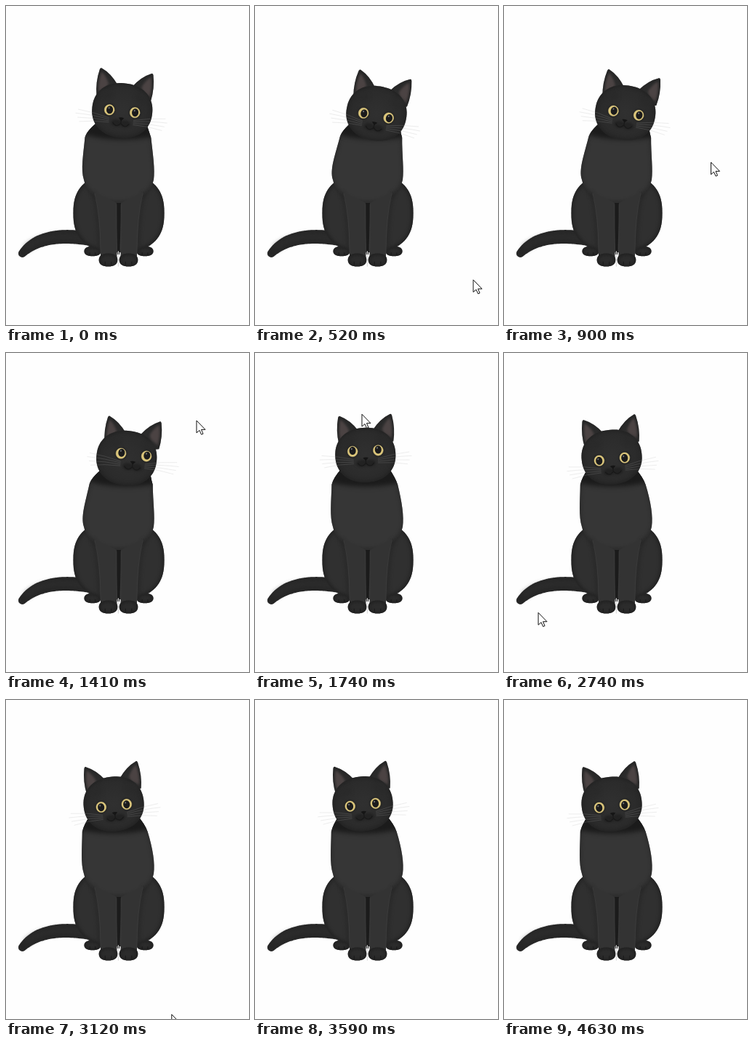
Animation, 334 px wide and 439 px high, one loop 4660 ms. Source, as an HTML page with a canvas:

```html
<!DOCTYPE html>
<html lang="en">
<head>
<meta charset="utf-8">
<title>Black cat watching the pointer</title>
<style>
html, body { margin: 0; width: 100%; height: 100%; overflow: hidden; background: #fefefe; }
canvas { display: block; }
</style>
</head>
<body>
<canvas id="stage" width="334" height="439"></canvas>
<script>
const ctx = document.getElementById('stage').getContext('2d');
const LOOP = 4660;
const MID = 155; // body axis
const SIDES = [-1, 1];

const POSES = [
  { t: 0, turn: 0.55, tilt: 6.3, look: 1.5 },
  { t: 520, turn: 1.03, tilt: 10.9, look: 2.4 },
  { t: 1410, turn: 0.95, tilt: 6.3, look: -5.5 },
  { t: 2100, turn: -1, tilt: -11, look: -4 },
  { t: 2740, turn: -0.23, tilt: -6.5, look: 2 }
];

const POINTER = [
  { t: 150, x: 294, y: 446 },
  { t: 520, x: 300, y: 377 },
  { t: 1080, x: 275, y: 150 },
  { t: 1410, x: 262, y: 93 },
  { t: 1620, x: 200, y: 75 },
  { t: 2100, x: 10, y: 166 },
  { t: 2740, x: 47, y: 357 },
  { t: 3300, x: 280, y: 446 }
];

// Monotone Hermite interpolation of one channel
function sample(keys, name, t) {
  const last = keys.length - 1;
  if (t >= keys[last].t) return keys[last][name];
  const i = Math.max(0, keys.findIndex(k => k.t > t) - 1);
  const slope = n => (keys[n + 1][name] - keys[n][name]) / (keys[n + 1].t - keys[n].t);
  const tangent = n => {
    if (n === 0 || n === last) return 0;
    const p = slope(n - 1), q = slope(n);
    return p * q <= 0 ? 0 : 2 * p * q / (p + q);
  };
  const a = keys[i], b = keys[i + 1], span = b.t - a.t;
  const u = (t - a.t) / span, w = 1 - u;
  return a[name] * (1 + 2 * u) * w * w + b[name] * u * u * (3 - 2 * u)
    + span * (tangent(i) * u * w * w - tangent(i + 1) * u * u * w);
}

function poseAt(t) {
  const turn = sample(POSES, 'turn', t);
  const tilt = sample(POSES, 'tilt', t) * Math.PI / 180;
  const breath = Math.sin(Math.PI * (t - 2740) / 1890) ** 2;
  const look = sample(POSES, 'look', t) - 1.5 * breath;
  return {
    turn, tilt, look,
    x: 151.5 + 15 * turn,
    y: 142.3 + 4.6 * turn * turn + 0.3 * look,
    earX: 13 * turn - 1 - 55 * Math.sin(tilt),
    faceX: -1.5 * turn * Math.min(0, look)
  };
}

function superellipse(x, y, rx, ry, power = 2) {
  const path = new Path2D();
  const bend = v => Math.sign(v) * Math.abs(v) ** (2 / power);
  for (let i = 0; i < 90; i++) {
    const a = i * Math.PI / 45;
    path.lineTo(x + rx * bend(Math.cos(a)), y + ry * bend(Math.sin(a)));
  }
  path.closePath();
  return path;
}

function fill(path, color) {
  ctx.fillStyle = color;
  ctx.fill(path);
}

function line(path, color, width = 1) {
  ctx.strokeStyle = color;
  ctx.lineWidth = width;
  ctx.stroke(path);
}

function soft(blur, draw) {
  ctx.save();
  ctx.filter = `blur(${blur}px)`;
  draw();
  ctx.restore();
}

// Filled shape with a shaded rim and optional inner details
function furry(path, color, rim, width, details) {
  fill(path, color);
  ctx.save();
  ctx.clip(path);
  soft(2, () => line(path, rim, width));
  if (details) details();
  ctx.restore();
}

function glow(r, inner, outer) {
  const g = ctx.createRadialGradient(0, 0, 0, 0, 0, r);
  g.addColorStop(0, inner);
  g.addColorStop(1, outer);
  return g;
}

function drawTail() {
  const tail = new Path2D();
  for (let u = 0; u <= 1; u += 0.01) {
    const w = 1 - u;
    const x = 112 * w * w + 2 * 49 * u * w + 22 * u * u;
    const y = 320 * w * w + 2 * 310 * u * w + 341 * u * u;
    const r = 9.5 - 4 * u ** 3;
    tail.moveTo(x + r, y);
    tail.arc(x, y, r, 0, Math.PI * 2);
  }
  fill(tail, '#262626');
  soft(3, () => line(new Path2D('M108 320Q56 311 30 332'), '#2d2d2d', 7));
}

function drawPaw(x, y, rx, ry) {
  furry(superellipse(x, y, rx, ry, 2.3), '#2c2c2c', '#1e1e1e', 4);
  for (const side of SIDES)
    line(new Path2D(`M${x + side * rx / 3} ${y + ry * 0.3}v${ry * 0.5}`), '#191919', 0.9);
}

function drawLeg(side) {
  ctx.save();
  ctx.translate(MID, 0);
  ctx.scale(side, 1);
  const leg = new Path2D('M33 256Q25 290 25 346H2.5Q3 310 3 271Z');
  soft(2.5, () => line(new Path2D('M35 258Q27 290 27 336'), '#252525', 3));
  fill(leg, '#333');
  line(new Path2D('M33 258Q25 290 25 340M3 273Q3 310 2.5 340'), 'rgba(78,78,78,.5)', 0.8);
  ctx.restore();
}

function drawBody(headX) {
  const lean = headX - 159;
  const pull = 4 * Math.exp(lean / 7);
  const left = 104 + pull, right = 199 + 0.4 * lean;
  for (const side of SIDES) drawPaw(MID + side * 36, 337.5, 11.5, 6.8);
  furry(superellipse(MID, 285, 62.5, 54, 2.5), '#303030', '#232323', 6);

  const chest = new Path2D();
  chest.moveTo(headX - 32, 158);
  chest.quadraticCurveTo(left + 2, 172, left, 181);
  chest.bezierCurveTo(104 + pull * 0.5, 205, 102.5, 225, 107, 239);
  chest.bezierCurveTo(116, 281, 194, 281, 203, 239);
  chest.bezierCurveTo(205, 225, 202, 205, right, 181);
  chest.quadraticCurveTo(right - 3, 172, headX + 32, 158);
  soft(2, () => line(new Path2D('M110 246C122 280 188 280 200 246'), '#272727', 3));
  furry(chest, '#363636', '#2a2a2a', 4, () =>
    soft(3, () => fill(superellipse(headX, 170, 56, 14), '#1b1b1b')));

  fill(new Path2D('M151 271H159L156 342H153Z'), '#1b1b1b');
  SIDES.forEach(drawLeg);
  for (const side of SIDES) drawPaw(154.5 + side * 14, 349.5, 12.8, 9);
  line(new Path2D('M154.4 338V358'), '#ddd', 1.3);
}

function drawEar(side) {
  ctx.save();
  ctx.scale(side, 1);
  const ear = new Path2D('M10 -34Q21 -49 34 -54.5Q36 -56 37 -53Q41 -35 37.5 -17L25 -15Z');
  furry(ear, '#2c2c2c', '#222', 3, () => soft(1.5, () =>
    fill(new Path2D('M34 -50Q38 -36 35 -22Q25 -25 23 -35Q27 -44 34 -50Z'), '#4b4343')));
  ctx.restore();
}

function drawEye(x, gazeX, gazeY) {
  const eye = superellipse(x, 1, 6.9, 7.2);
  soft(1, () => fill(superellipse(x, 1, 8, 8.2), '#1f1f1d'));
  fill(eye, '#dcc679');
  ctx.save();
  ctx.clip(eye);
  fill(superellipse(x + gazeX, 1 + gazeY, 4.5, 5.5), '#1b1b1c');
  fill(superellipse(x + gazeX - 1.2, gazeY - 1.5, 1, 1.2), '#707274');
  ctx.restore();
  line(eye, 'rgba(200,186,140,.6)', 0.7);
}

function drawFace({ turn, look }) {
  soft(1.6, () => {
    for (const side of SIDES) fill(superellipse(side * 6, 18, 7.5, 5), '#222');
  });
  line(new Path2D('M-11 18Q-6 25 0 18Q6 25 11 18M0 13V18'), '#191919', 1.2);
  fill(new Path2D('M-3.8 10.5Q0 9 3.8 10.5L0 14.5Z'), '#151515');
  for (const side of SIDES) {
    drawEye(17.6 * side, turn * 0.8, Math.min(0.3, look * 0.15));
    for (let i = 0; i < 4; i++) {
      const y = 12 + i * 2, reach = 60 + 3 * Math.sin(i * 1.6), endY = 5 + i * 5.5;
      line(new Path2D(`M${17 * side} ${y}Q${38 * side} ${(y + endY) / 2 - 2} ${reach * side} ${endY}`),
        'rgba(165,165,165,.28)', 0.7);
    }
  }
}

function drawHead(pose) {
  ctx.save();
  ctx.translate(pose.x, pose.y);
  ctx.rotate(pose.tilt);
  ctx.save();
  ctx.translate(pose.earX, 0);
  SIDES.forEach(drawEar);
  ctx.restore();
  furry(superellipse(0, 0, 41.5, 37.5, 2.2), glow(46, '#303030', '#292929'), '#222', 4);
  // Blend the ear bases into the skull
  soft(2, () => {
    for (const side of SIDES)
      fill(superellipse(pose.earX + side * 25, -20, 9, 6), '#2a2a2a');
  });
  ctx.translate(pose.faceX, pose.look);
  drawFace(pose);
  ctx.restore();
}

function drawPointer(x, y) {
  const arrow = new Path2D('M0 0V16.5L4 13L6.6 18.8L9 17.8L6.5 12H11.6Z');
  ctx.save();
  ctx.translate(x, y + 0.5);
  fill(arrow, '#fff');
  line(arrow, '#111', 1);
  ctx.restore();
}

function frame(now) {
  const t = now % LOOP;
  const pose = poseAt(t);
  ctx.fillStyle = '#fefefe';
  ctx.fillRect(0, 0, 334, 439);
  ctx.lineCap = ctx.lineJoin = 'round';
  drawTail();
  drawBody(pose.x);
  drawHead(pose);
  if (t > POINTER[0].t && t < POINTER[POINTER.length - 1].t)
    drawPointer(sample(POINTER, 'x', t), sample(POINTER, 'y', t));
  requestAnimationFrame(frame);
}
frame(performance.now());
</script>
</body>
</html>
```
